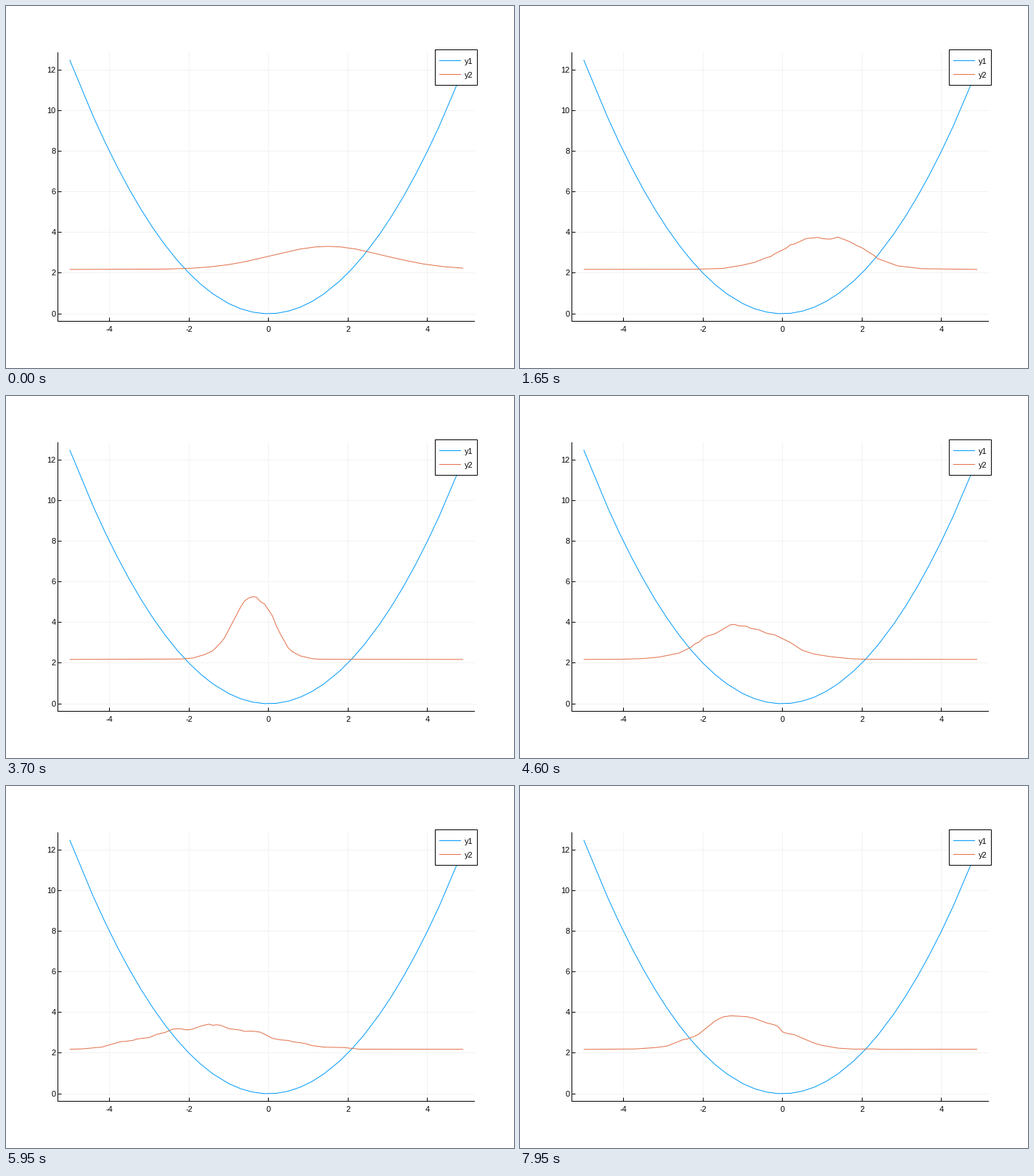
Write a matplotlib script that moves like this. It is 700 px wide and 500 px high and loops after 8000 ms.

```python
import math

import numpy as np
import matplotlib.pyplot as plt
from matplotlib.animation import FuncAnimation
from matplotlib.patches import Rectangle

W, H, DPI = 700, 500, 100
FRAMES, INTERVAL = 160, 50
DT = 0.025
BLUE, ORANGE, GRID = "#009AFA", "#E36F47", "#F2F2F2"
PX = 72 / DPI  # one pixel in points
TOLERANCE = 0.5  # line simplification, in pixels

# Wave packet in a harmonic trap on a periodic grid
N, DX = 100, 0.1
X0, SIGMA = 1.5, 2.0
LEVEL, SCALE = 2.18, 40
x = -5 + DX * np.arange(N)
potential = x**2 / 2
k = 2 * np.pi * np.fft.fftfreq(N, DX)
kinetic = np.fft.ifft(k[:, None]**2 / 2 * np.fft.fft(np.eye(N), axis=0), axis=0).real
ham = (kinetic + kinetic.T) / 2 + np.diag(potential)
energy, modes = np.linalg.eigh(ham)
psi0 = np.exp(-(x - X0)**2 / (2 * SIGMA**2))
psi0 /= np.linalg.norm(psi0)
coeffs = modes.T @ psi0


def density(i):
    psi = modes @ (np.exp(-1j * energy * DT * i) * coeffs)
    return LEVEL + SCALE * np.abs(psi)**2


def px(v):
    return 361.6 + 54.76 * v


def py(v):
    return 425.0 - 28.04 * v


def center(v):
    return math.floor(v) + 0.5


def simplify(pts):
    """Douglas-Peucker line reduction."""
    if len(pts) < 3:
        return pts
    d = pts[-1] - pts[0]
    rel = pts - pts[0]
    dist = np.abs(d[0] * rel[:, 1] - d[1] * rel[:, 0]) / np.hypot(*d)
    far = int(dist.argmax())
    if dist[far] <= TOLERANCE:
        return pts[[0, -1]]
    return np.vstack([simplify(pts[:far + 1])[:-1], simplify(pts[far:])])


def curve(values):
    return simplify(np.column_stack([px(x), py(values)])).T


fig = plt.figure(figsize=(W / DPI, H / DPI), dpi=DPI, facecolor="white")
ax = fig.add_axes([0, 0, 1, 1])
ax.set_xlim(0, W)
ax.set_ylim(H, 0)
ax.axis("off")


def stroke(xs, ys, color, z):
    return ax.plot(xs, ys, color=color, lw=PX, zorder=z, snap=False,
                   solid_capstyle="butt", solid_joinstyle="round")[0]


def label(xp, yp, text, ha, z=4):
    ax.text(xp, yp, text, ha=ha, va="baseline", color="black",
            family="Liberation Sans", fontsize=11 * PX, zorder=z)


LEFT, RIGHT, TOP, BOTTOM = 71.5, 646, 64, 435.5

for v in range(-4, 5, 2):
    g = center(px(v))
    stroke([g, g], [TOP, BOTTOM], GRID, 1)
    stroke([g, g], [BOTTOM, BOTTOM - 5], "black", 2)
    label(g, 450.2, str(v), "center")

for v in range(0, 13, 2):
    g = center(py(v))
    stroke([LEFT, RIGHT], [g, g], GRID, 1)
    stroke([LEFT, LEFT + 5], [g, g], "black", 2)
    label(68.4, g + 3.6, str(v), "right")

stroke([LEFT, LEFT], [TOP, BOTTOM + 0.5], "black", 2)
stroke([LEFT - 0.5, RIGHT], [BOTTOM, BOTTOM], "black", 2)

stroke(*curve(potential), BLUE, 3)
wave = stroke(*curve(density(0)), ORANGE, 3)

# Legend
ax.add_patch(Rectangle((591.5, 60.5), 58, 49, fc="white", ec="black",
                       lw=PX, snap=False, zorder=5))
for yp, color, name in ((75.5, BLUE, "y1"), (94.5, ORANGE, "y2")):
    stroke([597, 627], [yp, yp], color, 6)
    label(631.6, yp + 4.3, name, "left", 6)


def update(i):
    wave.set_data(*curve(density(i)))
    return (wave,)


anim = FuncAnimation(fig, update, frames=FRAMES, interval=INTERVAL,
                     init_func=lambda: update(0), repeat=True, repeat_delay=0)
plt.show()
```
